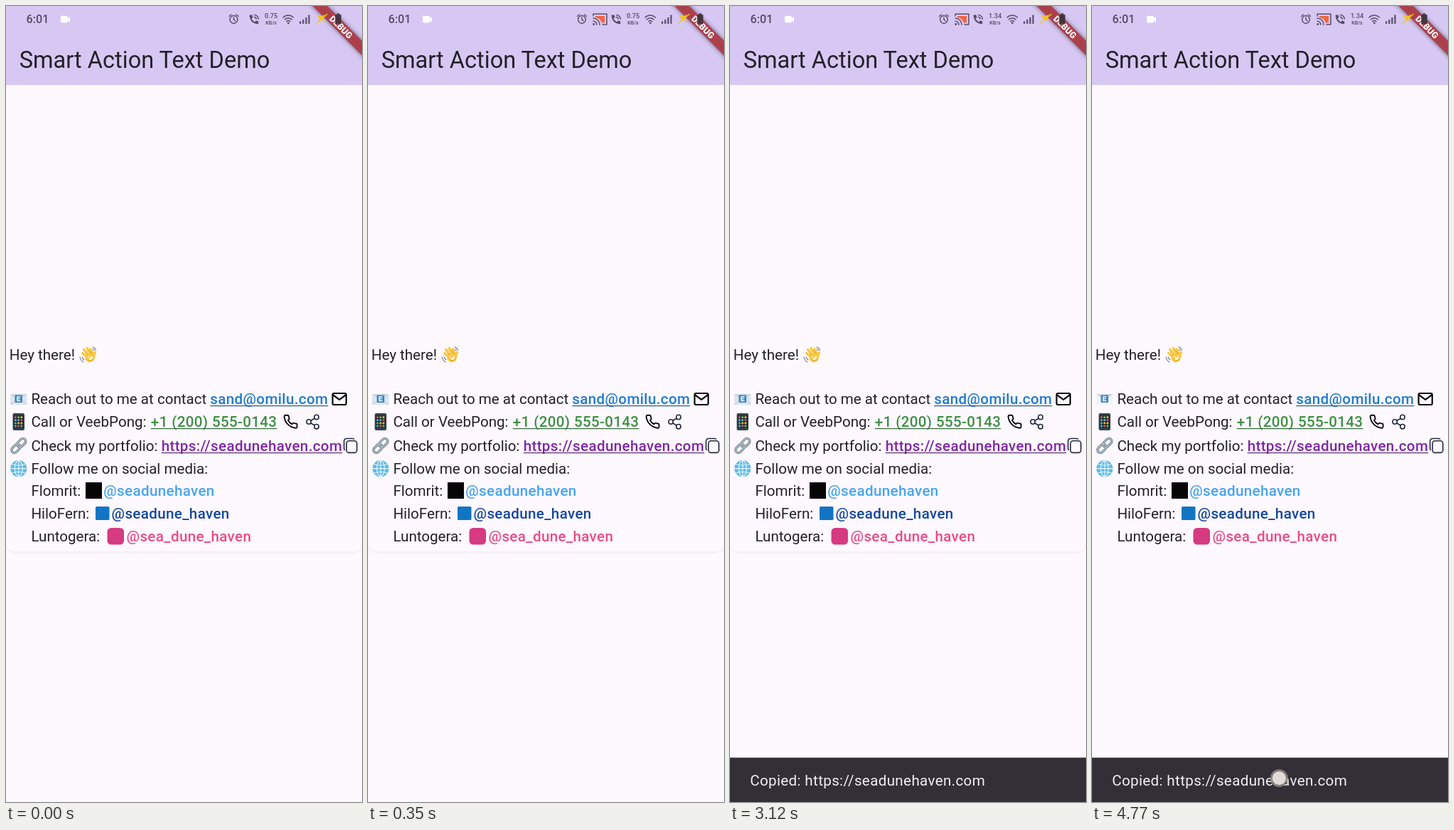
Recreate the animation shown at these times as an HTML page. Size 501 by 1118 pixels, loop 4.99 s.

```html
<!DOCTYPE html>
<html lang="en">
<head>
<meta charset="utf-8">
<title>Smart Action Text Demo</title>
<style>
  html, body { margin: 0; width: 100%; height: 100%; overflow: hidden; background: #fef8ff; }
  svg { display: block; width: 501px; height: 1118px; }
  text { font-family: Roboto, "Noto Sans", sans-serif; fill: #232027; white-space: pre; }
  .body text { font-size: 20.6px; }
  .body .link { font-size: 20.65px; font-weight: 500; letter-spacing: .32px; }
  .line { fill: none; stroke-linecap: round; stroke-linejoin: round; }
  .status { fill: #594e68; stroke: #594e68; stroke-width: 0; }
  .status text { fill: #554a63; font-weight: 500; }
  .status .line { fill: none; stroke-width: 1.5; }
</style>
</head>
<body>
<svg viewBox="0 0 501 1118">
  <defs>
    <filter id="soft" x="-20%" y="-60%" width="140%" height="220%"><feGaussianBlur stdDeviation="3"/></filter>
    <filter id="edge" x="-5%" y="-5%" width="110%" height="110%"><feGaussianBlur stdDeviation="2"/></filter>
    <clipPath id="below"><rect y="740" width="501" height="40"/></clipPath>
  </defs>

  <rect width="501" height="1118" fill="#fef8ff"/>
  <g id="card" clip-path="url(#below)">
    <rect y="467" width="501" height="301" rx="12" fill="#000" opacity=".05" filter="url(#edge)"/>
    <rect y="466" width="501" height="300" rx="12" fill="#fef8ff"/>
  </g>

  <rect id="header" width="501" height="111"/>
  <text x="18.700" y="87" font-size="32.550">Smart Action Text Demo</text>

  <!-- corner banner -->
  <g transform="translate(501 0) rotate(45)">
    <rect x="-80" y="34.400" width="160" height="14.800" fill="#000" opacity=".5" filter="url(#soft)"/>
    <rect x="-80" y="34.400" width="160" height="14.800" fill="#b03c48" opacity=".92"/>
    <text y="46.200" font-size="12.400" font-weight="900" text-anchor="middle" style="fill:#fff">DEBUG</text>
  </g>

  <!-- status bar -->
  <g class="status">
    <text x="28.500" y="24.300" font-size="16.200">6:01</text>
    <path d="M79 14h6q2 0 2 2v1.500l3-2.500v8l-3-2.500v1q0 2-2 2h-6q-2 0-2-2v-6q0-2 2-2z" fill="#fff"/>
    <g id="alarm">
      <circle class="line" cy="19" r="5.400"/>
      <path class="line" d="M0 16v3.200l2 1.500M-6.500 14.500l3-2.500M6.500 14.500l-3-2.500"/>
    </g>
    <g id="cast">
      <path class="line" d="M317 14v-2.800h19v14.800h-6"/>
      <path d="M320 14h13v9.500h-4.500a9 9 0 0 0-8.500-7z" fill="#f4663f"/>
      <path class="line" d="M317 17.200a9 9 0 0 1 9 9M317 21.200a5 5 0 0 1 5 5"/>
      <circle cx="317.800" cy="25.600" r="1.500"/>
    </g>
    <path d="M343.500 12.500h3l1 3.500-2 1.800a11 11 0 0 0 4.600 4.600l1.800-2 3.400 1v3.100q0 .8-.8.800c-7 0-11.800-5-11.800-12q0-.8.800-.800z"/>
    <path class="line" d="M349.500 12.500a5.800 5.800 0 0 1 5.800 5.800M349.500 15.600a2.700 2.700 0 0 1 2.700 2.700"/>
    <g text-anchor="middle">
      <text id="rate" x="373" y="17" font-size="9.200"></text>
      <text x="373" y="26" font-size="7.200" font-weight="700">KB/s</text>
    </g>
    <path class="line" d="M390 16a10.500 10.500 0 0 1 14.500 0M392.300 19a7 7 0 0 1 10 0M394.700 21.800a3.800 3.800 0 0 1 5.200 0"/>
    <circle cx="397.300" cy="24" r="1.400"/>
    <path d="M413 21.500h2.200v3.500h-2.200zM417.200 19h2.200v6h-2.200zM421.300 16h2.200v9h-2.200zM425.400 12.500h2.200v12.500h-2.200z"/>
    <g fill="#f6c51c" stroke="#f6c51c">
      <path d="M437.500 13.500l6.500 1 5-3-2.500 5 2.500 4-5-1-4 2 1-4z"/>
      <path class="line" d="M437 24.500l15-13"/>
    </g>
    <path d="M465.500 10.500h4v1.800h2.200v13.200h-8.400v-13.200h2.200z" fill="#46343f"/>
  </g>

  <!-- message -->
  <g class="body">
    <text x="4.700" y="497">Hey there!</text>
    <g transform="translate(116 490)">
      <g id="hand" class="line">
        <path d="M-6.500-7.500L3 2M-2-9.500L5-1M3-8L7-1M-8.500-2.500L0 5M9.500-3.500L7.500 3" stroke-width="3.200"/>
        <path d="M-3 0L5-2l3 5-2 4.500-5 1.500-4-3z" stroke-width="3"/>
      </g>
      <path class="line" d="M-5.500-4l5 5M-1.500-6.500l5 5M2-6l4 4.500M-1 7q4 3 8-1" stroke="#dc9a2c" stroke-width=".9"/>
      <path class="line" d="M6-11q3.500 1 4.500 4.500M-12 3q1 5 5 7M-9 3q1 3 3 4M6-8q1.500.5 2 2" stroke="#6b7883" stroke-width="1.100"/>
    </g>

    <text x="35.400" y="559">Reach out to me at contact</text>
    <text x="287.300" y="559" class="link under" style="fill:#1f7bd0">sand@omilu.com</text>
    <g>
      <g id="paper">
        <rect x="6" y="545" width="23.500" height="15" rx="1" fill="#dce5ec"/>
        <path class="line" d="M6.500 559.500l8-6M29 559.500l-8-6" stroke="#b9c7d1"/>
      </g>
      <path d="M6 545h23.500l-11.700 9z" fill="#c7d5df"/>
      <rect x="12.500" y="546.500" width="10.500" height="10.500" rx="1" fill="#3a85c0"/>
      <path class="line" d="M20 549h-4.200v5.500h4.200M16 551.700h3.500" stroke="#fff" stroke-width="1.300"/>
    </g>
    <g class="line" stroke="#0b0b0d" stroke-width="2.200">
      <rect x="459.600" y="544" width="19.200" height="16" rx="2"/>
      <path d="M460.500 546.500l8.700 6.300 8.700-6.300"/>
    </g>

    <text x="35.400" y="591">Call or VeebPong:</text>
    <text x="203.800" y="591" class="link under" style="fill:#3c9142">+1 (200) 555-0143</text>
    <rect x="9.500" y="572" width="16.500" height="24" rx="2" fill="#35434b"/>
    <rect x="11" y="575" width="13.500" height="17.500" fill="#1d2b33"/>
    <g id="apps"></g>
    <path class="line" transform="translate(389.800 573) scale(.9)" stroke="#0b0b0d" stroke-width="2.100"
      d="M22 17v3a2 2 0 0 1-2.200 2A20 20 0 0 1 2 4.200A2 2 0 0 1 4 2h3a2 2 0 0 1 2 1.700c.1 1 .4 1.900.7 2.800a2 2 0 0 1-.5 2.100L8 9.900a16 16 0 0 0 6 6l1.300-1.300a2 2 0 0 1 2.100-.4c.9.300 1.800.600 2.800.700A2 2 0 0 1 22 17z"/>
    <g class="line" stroke="#252a40" stroke-width="1.600">
      <path d="M428.800 582.500l5.400-3.300M428.800 585.700l5.400 3.300"/>
      <circle cx="437" cy="577.500" r="3.200"/><circle cx="426.200" cy="584" r="3.200"/><circle cx="437" cy="590.700" r="3.200"/>
    </g>

    <text x="35.400" y="625">Check my portfolio:</text>
    <text x="218.700" y="625" class="link under" style="fill:#7e27a6">https://seadunehaven.com</text>
    <g class="line" transform="translate(17.800 617.500) rotate(-45)">
      <g stroke="#75848d" stroke-width="3.400">
        <rect x="-12.500" y="-4" width="14" height="8" rx="4"/><rect x="-1.500" y="-4" width="14" height="8" rx="4"/>
      </g>
      <g stroke="#b4c2ca" stroke-width="1.400">
        <rect x="-12.500" y="-4" width="14" height="8" rx="4"/><rect x="-1.500" y="-4" width="14" height="8" rx="4"/>
      </g>
    </g>
    <g class="line" stroke="#252a40" stroke-width="1.600">
      <rect x="479.200" y="610.800" width="14.600" height="16.600" rx="3.500"/>
      <path d="M476.500 623.500q-.8-1-.8-2.500v-9.500q0-4 4-4h7.500q1.700 0 2.500.8"/>
    </g>

    <text x="35.400" y="657">Follow me on social media:</text>
    <circle cx="17.800" cy="649.700" r="11.600" fill="#5fbbe4"/>
    <g class="line" stroke="#e2f4fc" stroke-width="1.200">
      <ellipse cx="17.800" cy="649.700" rx="5.500" ry="11"/>
      <path d="M17.800 638.500v22.400M6.500 649.700h22.600M8.500 643.500q9.300 3.500 18.600 0M8.500 656q9.300-3.500 18.600 0"/>
    </g>

    <text x="35.400" y="688">Flomrit:</text>
    <rect x="112" y="669" width="23" height="23" fill="#050505"/>
    <text x="137.300" y="688" class="link" style="fill:#46a5ee">@seadunehaven</text>
    <text x="35.400" y="720">HiloFern:</text>
    <rect x="126" y="703" width="19.500" height="19" rx="1.500" fill="#1275c4"/>
    <text x="148.600" y="720" class="link" style="fill:#1448a0">@seadune_haven</text>
    <text x="35.400" y="752">Luntogera:</text>
    <rect x="142.500" y="733" width="23.500" height="23.500" rx="5.500" fill="#d63a80"/>
    <text x="169.600" y="752" class="link" style="fill:#e94d86">@sea_dune_haven</text>
  </g>

  <g id="tap">
    <circle cx="480.500" cy="611" r="12.500" fill="#fffdf8" fill-opacity=".6" stroke="#f8ebc4" stroke-width="1.300"/>
  </g>

  <g id="snack">
    <rect width="501" height="64" fill="#322f37"/>
    <text x="28.200" y="39.300" font-size="20.650" letter-spacing=".33" style="fill:#f3edf6">Copied: https://seadunehaven.com</text>
  </g>
  <g id="touch">
    <circle cx="263.300" cy="1084.500" r="12.500" fill="#8d8779" fill-opacity=".85"/>
    <circle cx="263.300" cy="1084.500" r="9.500" fill="#e9e6e2" fill-opacity=".9"/>
  </g>
</svg>
<script>
  const $ = id => document.getElementById(id);
  const LOOP = 4990;

  function add(parent, name, attrs) {
    const node = document.createElementNS('http://www.w3.org/2000/svg', name);
    for (const key in attrs) node.setAttribute(key, attrs[key]);
    parent.append(node);
  }

  const colors = ['#e8554d', '#4fb3e8', '#f3b93c', '#63b967'];
  for (let i = 0; i < 12; i++) {
    add($('apps'), 'rect', { x: 12 + i % 3 * 4.2, y: 576.2 + Math.floor(i / 3) * 4.1,
      width: 2.8, height: 2.8, rx: .6, fill: colors[(i * 3 + (i >> 2)) % 4] });
  }

  const hand = $('hand');
  hand.setAttribute('stroke', '#fbc93f');
  hand.setAttribute('fill', '#fbc93f');

  // thin rule under each link, as wide as its text
  for (const link of document.querySelectorAll('.under')) {
    add(link.parentNode, 'rect', { x: link.getAttribute('x'), y: +link.getAttribute('y') + 2,
      width: link.getComputedTextLength(), height: 1.2,
      fill: `color-mix(in srgb, ${link.style.fill} 65%, #232027)` });
  }

  // snack: top edge of the bar; pale: washed-out light tones
  const steps = [
    { at: 0,    alarm: 320.5, cast: 0, rate: '0.75', snack: 1118, pale: 0 },
    { at: 350,  alarm: 301,   cast: 1, rate: '0.75', snack: 1118, pale: 0 },
    { at: 2910, alarm: 301,   cast: 1, rate: '1.34', snack: 1104, pale: 1, tap: 1 },
    { at: 3120, alarm: 301,   cast: 1, rate: '1.34', snack: 1055.7, pale: 0 },
    { at: 4770, alarm: 301,   cast: 1, rate: '1.34', snack: 1055.7, pale: 1, touch: 1 }
  ];
  const show = (id, on) => $(id).setAttribute('visibility', on ? 'visible' : 'hidden');
  let current;

  function draw(time) {
    const step = steps.filter(s => s.at <= time).pop();
    if (step === current) return;
    current = step;
    $('alarm').setAttribute('transform', `translate(${step.alarm} 0)`);
    $('snack').setAttribute('transform', `translate(0 ${step.snack})`);
    $('header').setAttribute('fill', step.tap ? '#dacdef' : '#d7c8f3');
    $('paper').setAttribute('opacity', step.pale ? .25 : 1);
    $('rate').textContent = step.rate;
    show('cast', step.cast);
    show('card', !step.pale);
    show('tap', step.tap);
    show('touch', step.touch);
  }

  const start = performance.now();
  function tick() {
    draw((performance.now() - start) % LOOP);
    requestAnimationFrame(tick);
  }
  tick();
</script>
</body>
</html>
```
